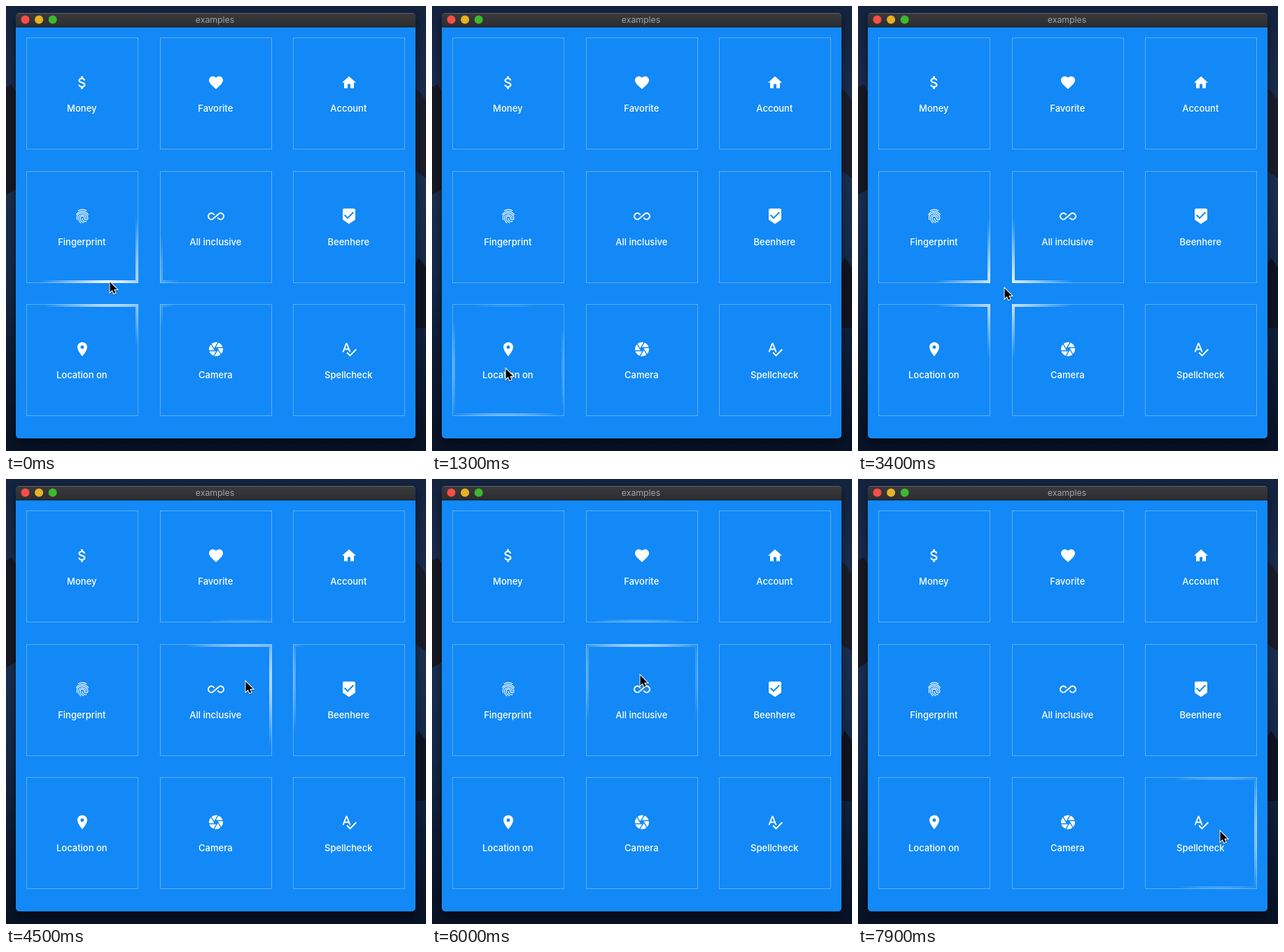
Recreate the animation shown at these times as an HTML page with a canvas. Size 600 by 636 pixels, loop 8000 ms.

```html
<!DOCTYPE html>
<html lang="en">
<head>
<meta charset="utf-8">
<title>examples</title>
<style>
  html, body { margin: 0; width: 100%; height: 100%; overflow: hidden; background: #0a1428; }
  canvas { display: block; }
</style>
</head>
<body>
<canvas id="stage" width="600" height="636"></canvas>
<script>
const ctx = document.getElementById('stage').getContext('2d');
const LOOP = 8000, STEP = 100, GLOW = 100, BLUE = '#1289f6';

// Pointer tip: time, x, y
const route = [
  [0, 148, 394], [1300, 105, 518], [3400, 209, 403], [4500, 342, 289],
  [6000, 297, 280], [6900, 378, 422], [7900, 517, 503]
];

// Icons live on a 24-unit grid
const cards = [
  { label: 'Money', d: 'M11.8 10.9c-2.27-.59-3-1.2-3-2.15 0-1.09 1.01-1.85 2.7-1.85 1.78 0 2.44.85 2.5 2.1h2.21c-.07-1.72-1.12-3.3-3.21-3.81V3h-3v2.16c-1.94.42-3.5 1.68-3.5 3.61 0 2.31 1.91 3.46 4.7 4.13 2.5.6 3 1.48 3 2.41 0 .69-.49 1.79-2.7 1.79-2.06 0-2.87-.92-2.98-2.1h-2.2c.12 2.19 1.76 3.42 3.68 3.83V21h3v-2.15c1.95-.37 3.5-1.5 3.5-3.55 0-2.84-2.43-3.81-4.7-4.4z' },
  { label: 'Favorite', d: 'M12 21.35l-1.45-1.32C5.4 15.36 2 12.28 2 8.5 2 5.42 4.42 3 7.5 3c1.74 0 3.41.81 4.5 2.09C13.09 3.81 14.76 3 16.5 3 19.58 3 22 5.42 22 8.5c0 3.78-3.4 6.86-8.55 11.54z' },
  { label: 'Account', d: 'M10 20v-6h4v6h5v-8h3L12 3 2 12h3v8z' },
  { label: 'Fingerprint', stroke: 1.1, d: 'M6.2 4C9.8 2 14.2 2 17.8 4M3.5 9.7C7.2 3.6 16.8 3.6 20.5 9.7M4.6 17C3.2 11 6.5 7.4 12 7.4c4.4 0 7.9 3.2 7.9 7.2 0 1.5-.8 2.6-2.3 2.6s-2.6-1.2-2.6-2.6a3 3 0 0 0-6 0c0 3 1.7 5.6 4.9 6.6M9.7 21.5C7.8 19.6 6.5 17.9 6.5 14.7c0-2.8 2.4-5 5.5-5s5.5 2.2 5.5 5M12 14.8c0 3.2 2.4 5.3 5.7 4.8' },
  { label: 'All inclusive', stroke: 2, d: 'M9.7 10L8.5 8.9A4.38 4.38 0 1 0 8.5 15.1L15.5 8.9A4.38 4.38 0 1 1 15.5 15.1L14.3 14' },
  { label: 'Beenhere', d: 'M19 1H5c-1.1 0-2 .9-2 2v12.93c0 .69.35 1.3.88 1.66L12 23l8.11-5.41c.53-.36.88-.97.88-1.66L21 3c0-1.1-.9-2-2-2zm-9 15l-5-5 1.41-1.41L10 13.17l7.59-7.59L19 7z' },
  { label: 'Location on', d: 'M12 2C8.13 2 5 5.13 5 9c0 5.25 7 13 7 13s7-7.75 7-13c0-3.87-3.13-7-7-7zm0 9.5a2.5 2.5 0 1 1 0-5 2.5 2.5 0 0 1 0 5z' },
  { label: 'Camera', turns: 6, d: 'M21.54 9c-.92-2.92-3.15-5.26-6-6.34L11.88 9z' },
  { label: 'Spellcheck', d: 'M12.45 16h2.09L9.43 3H7.57L2.46 16h2.09l1.12-3h5.64zm-6.02-5L8.5 5.48 10.57 11zm15.16.59l-8.09 8.09L9.83 16l-1.41 1.41 5.09 5.09L23 13z' }
];

const frames = new Path2D();
cards.forEach((card, i) => {
  card.x = Math.round(29 + 190.5 * (i % 3));
  card.y = Math.round(45 + 190.5 * Math.floor(i / 3));
  card.path = new Path2D(card.d);
  frames.rect(card.x, card.y, 160, 160);
  frames.rect(card.x + 4, card.y + 4, 152, 152);
});
const arrow = new Path2D('M0 0V14.6L3.3 11.5 5.5 16.6 8 15.5 5.8 10.5H10.4z');

function fill(color, path, rule) {
  ctx.fillStyle = color;
  ctx.fill(path, rule);
}

function shape(d, color) { fill(color, new Path2D(d)); }

function vertical(y0, y1, ...colors) {
  const g = ctx.createLinearGradient(0, y0, 0, y1);
  colors.forEach((c, i) => g.addColorStop(i / (colors.length - 1), c));
  return g;
}

function text(str, x, y, font, color) {
  ctx.font = font + ' Inter, "Open Sans", sans-serif';
  ctx.textAlign = 'center';
  ctx.fillStyle = color;
  ctx.fillText(str, x, y);
}

function drawDesktop() {
  ctx.fillStyle = vertical(0, 636, '#14233f', '#1b2d50', '#1a3052', '#142a4a', '#0d1c35', '#081226');
  ctx.fillRect(0, 0, 600, 636);
  shape('M0 116L8 112 14 122V262L0 270z', '#171923');
  shape('M600 136L592 124 585 118V236L600 246z', '#1b1e2a');
  shape('M600 374L590 360 585 368V460H600z', '#10141f');
}

function drawWindow() {
  const body = new Path2D();
  body.roundRect(14, 10, 571, 608, 5);
  ctx.save();
  ctx.shadowColor = 'rgba(0,0,0,.55)';
  ctx.shadowBlur = 16;
  ctx.shadowOffsetY = 6;
  fill(BLUE, body);
  ctx.restore();

  ctx.save();
  ctx.clip(body);
  ctx.fillStyle = vertical(10, 30, '#3a3a3c', '#2d2d2f');
  ctx.fillRect(14, 10, 571, 20);
  ctx.fillStyle = '#626366';
  ctx.fillRect(14, 10, 571, 1);
  ctx.fillStyle = '#15181c';
  ctx.fillRect(14, 29.5, 571, 1);
  ctx.restore();

  ['#fc4d48', '#e5b324', '#3eb730'].forEach((color, i) => {
    const dot = new Path2D();
    dot.arc(27.5 + 19.6 * i, 19.6, 6, 0, 7);
    fill(color, dot);
  });
  text('examples', 298.5, 24.3, '400 12.3px', '#a3a3a5');
}

function drawCard({ x, y, label, path, stroke, turns = 1 }) {
  ctx.strokeStyle = 'rgba(255,255,255,.3)';
  ctx.lineWidth = 1;
  ctx.strokeRect(x + .5, y + .5, 159, 159);

  ctx.save();
  ctx.translate(x + 80, y + 64.5);
  for (let i = 0; i < turns; i++) {
    ctx.save();
    ctx.rotate(i * 2 * Math.PI / turns);
    ctx.translate(-12, -12);
    if (stroke) {
      ctx.strokeStyle = '#fff';
      ctx.lineWidth = stroke;
      ctx.lineCap = stroke < 2 ? 'round' : 'butt';
      ctx.stroke(path);
    } else {
      fill('#fff', path, 'evenodd');
    }
    ctx.restore();
  }
  ctx.restore();
  text(label, x + 79.3, y + 106, '500 13px', '#fff');
}

// Smooth curve through the route, with slopes taken from the neighbouring points
function pointer(t) {
  const last = route.length - 1;
  let i = 0;
  while (i < last - 1 && t >= route[i + 1][0]) i++;
  const a = route[i], b = route[i + 1], span = b[0] - a[0];
  const u = Math.min(1, (t - a[0]) / span);
  const slope = (k, axis) => {
    const p = route[Math.max(0, k - 1)], q = route[Math.min(last, k + 1)];
    return (q[axis] - p[axis]) / (q[0] - p[0]) * span;
  };
  return [1, 2].map(axis =>
    a[axis] * (1 + 2 * u) * (1 - u) ** 2 + slope(i, axis) * u * (1 - u) ** 2 +
    b[axis] * u * u * (3 - 2 * u) + slope(i + 1, axis) * u * u * (u - 1));
}

function drawPointer(x, y) {
  const light = ctx.createRadialGradient(x, y, 0, x, y, GLOW);
  light.addColorStop(0, '#fff');
  light.addColorStop(1, 'rgba(255,255,255,0)');
  fill(light, frames, 'evenodd');

  ctx.save();
  ctx.translate(x + .5, y + .5);
  ctx.shadowColor = 'rgba(0,0,0,.35)';
  ctx.shadowBlur = 2;
  ctx.shadowOffsetY = 1;
  ctx.strokeStyle = '#fff';
  ctx.lineWidth = 2;
  ctx.stroke(arrow);
  ctx.shadowColor = 'transparent';
  fill('#000', arrow);
  ctx.restore();
}

function draw(now) {
  const t = Math.floor(now % LOOP / STEP) * STEP;
  drawDesktop();
  drawWindow();
  cards.forEach(drawCard);
  drawPointer(...pointer(t));
  requestAnimationFrame(draw);
}
requestAnimationFrame(draw);
</script>
</body>
</html>
```
